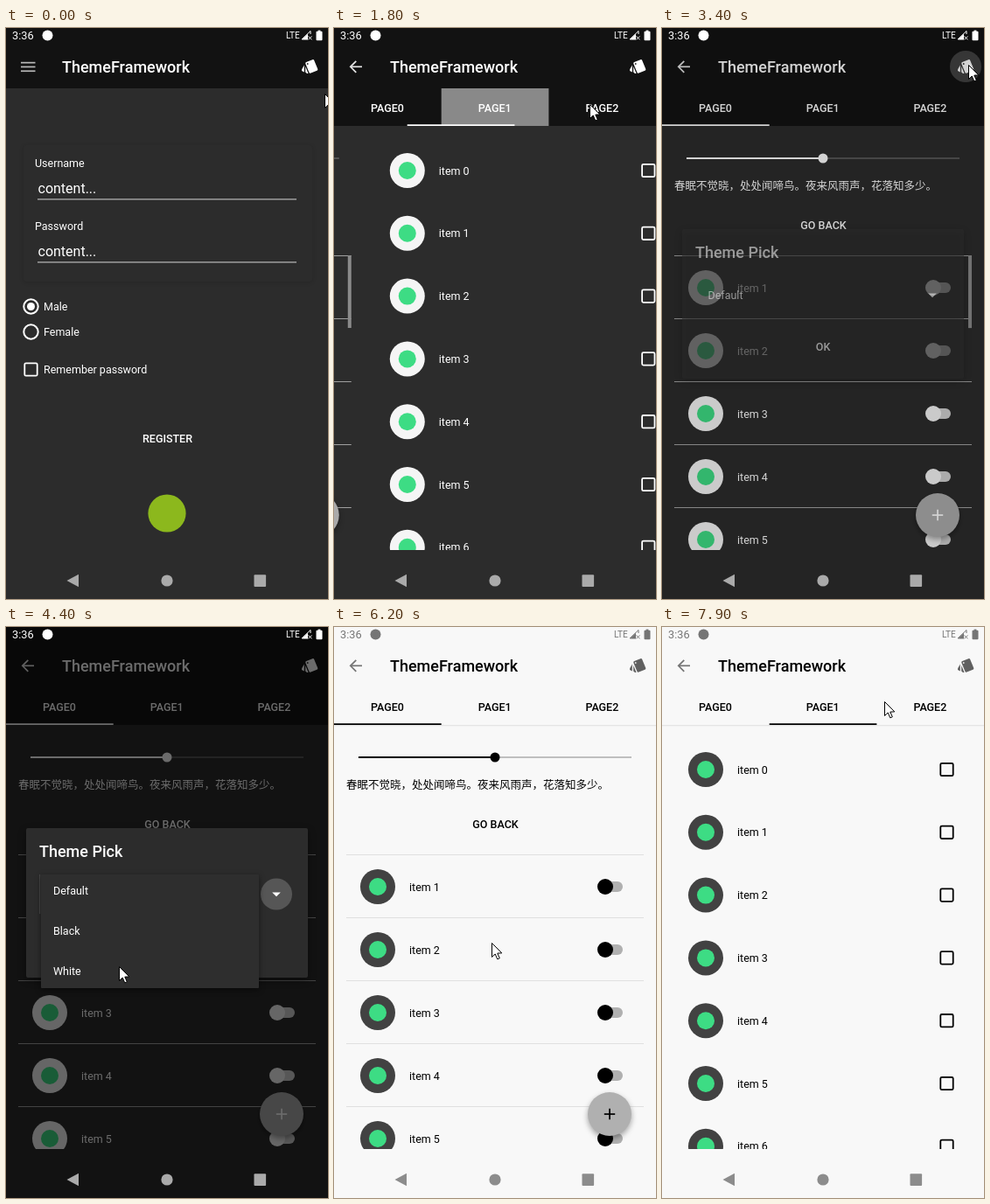
Write an HTML page with a canvas that moves like this. It is 368 px wide and 653 px high and loops after 8000 ms.

```html
<!DOCTYPE html>
<html lang="en">
<head>
<meta charset="utf-8">
<title>ThemeFramework</title>
<style>
html, body { margin: 0; width: 100%; height: 100%; overflow: hidden; background: #2c2c2c; }
canvas { display: block; width: 368px; height: 653px; }
</style>
</head>
<body>
<canvas id="stage"></canvas>
<script>
const W = 368, H = 653, LOOP = 8000, TAU = Math.PI * 2;
const canvas = document.getElementById('stage');
const g = canvas.getContext('2d');
const dpr = window.devicePixelRatio || 1;
canvas.width = W * dpr;
canvas.height = H * dpr;

const DARK = {
  bg: '#2c2c2c', bar: '#121212', fg: '#fff', icon: '#e4e4e4', status: '#fff', nav: '#aaa',
  disc: '#f5f5f5', line: '#a0a0a0', off: '#626262', thumb: '#f4f4f4', track: '#cfcfcf',
  fab: '#aaa', scroll: '#8a8a8a', ripple: .5
};
const LIGHT = {
  bg: '#f8f8f8', bar: '#f8f8f8', fg: '#000', icon: '#757575', status: '#757575', nav: '#8c8c8c',
  disc: '#424242', line: '#e0e0e0', off: '#adadad', thumb: '#000', track: '#b0b0b0',
  fab: '#b0b0b0', scroll: '#b5b5b5', ripple: .2
};
let c = DARK;

// Timing
const clamp = v => Math.min(1, Math.max(0, v));
const ramp = (t, a, b) => clamp((t - a) / (b - a));
const mix = (a, b, k) => a + (b - a) * k;
const smooth = k => k * k * (3 - 2 * k);
const quint = k => 1 - (1 - k) ** 5;
const pulse = (t, a, b, grow = 100, fall = 200) => ramp(t, a, a + grow) * (1 - ramp(t, b, b + fall));
function standard(x) { // cubic-bezier(.4, 0, .2, 1)
  let lo = 0, hi = 1, s = .5;
  for (let i = 0; i < 20; i++) {
    s = (lo + hi) / 2;
    const r = 1 - s;
    if (1.2 * r * r * s + .6 * r * s * s + s ** 3 < x) lo = s; else hi = s;
  }
  return s * s * (3 - 2 * s);
}

// Drawing
function group(fn, alpha = 1, x = 0, y = 0) {
  if (alpha <= 0) return;
  g.save();
  g.globalAlpha *= alpha;
  g.translate(x, y);
  fn();
  g.restore();
}
function clip(x, y, w, h) {
  g.beginPath();
  g.rect(x, y, w, h);
  g.clip();
}
function rect(x, y, w, h, color, r = 0) {
  g.fillStyle = color;
  g.beginPath();
  g.roundRect(x, y, w, h, r);
  g.fill();
}
function disc(x, y, r, color) {
  g.fillStyle = color;
  g.beginPath();
  g.arc(x, y, r, 0, TAU);
  g.fill();
}
function ring(x, y, r, color) {
  g.strokeStyle = color;
  g.lineWidth = 2;
  g.beginPath();
  g.arc(x, y, r, 0, TAU);
  g.stroke();
}
function box(x, y, color) {
  g.strokeStyle = color;
  g.lineWidth = 1.8;
  g.beginPath();
  g.roundRect(x - 7.2, y - 7.2, 14.4, 14.4, 1.5);
  g.stroke();
}
function poly(points, color) {
  g.fillStyle = color;
  g.beginPath();
  for (let i = 0; i < points.length; i += 2) g.lineTo(points[i], points[i + 1]);
  g.closePath();
  g.fill();
}
function stroke(points, color, width) {
  g.strokeStyle = color;
  g.lineWidth = width;
  g.beginPath();
  for (let i = 0; i < points.length; i += 2) g.lineTo(points[i], points[i + 1]);
  g.stroke();
}
function text(s, x, y, { size = 12.5, weight = 400, align = 'left', color = c.fg } = {}) {
  g.font = `${weight} ${size}px Roboto, "Noto Sans CJK SC", "Noto Sans CJK", sans-serif`;
  g.textAlign = align;
  g.fillStyle = color;
  g.fillText(s, x, y);
}
const button = (s, x, y) => text(s, x, y, { weight: 500, align: 'center' });
function shadow(blur, dy, alpha, fn) {
  g.save();
  g.shadowColor = `rgba(0,0,0,${alpha})`;
  g.shadowBlur = blur * dpr;
  g.shadowOffsetY = dy * dpr;
  fn();
  g.restore();
}

function toolbar(t, back) {
  rect(0, 0, W, 69, c.bar);
  if (back) {
    stroke([32, 44.3, 19, 44.3], c.icon, 1.7);
    stroke([25.3, 37.8, 18.8, 44.3, 25.3, 50.8], c.icon, 1.7);
  } else {
    for (const y of [38.8, 43.6, 48.4]) rect(17, y, 16.5, 1.7, '#b8b8b8');
  }
  text('ThemeFramework', 64, 51.3, { size: 18, weight: 500 });
  group(() => disc(347, 44, 18, c.fg), .2 * pulse(t, 3180, 3450));
  const color = c === DARK ? '#fff' : '#606060';
  group(() => {
    g.rotate(-.39);
    rect(-5, -6.8, 10.6, 13.6, color, 1.5);
    disc(-2.8, -4.4, .9, c.bar);
  }, 1, 349, 44);
  poly([342.2, 44, 345.5, 52, 344, 52, 342.2, 50.5], color);
  poly([340.8, 42.5, 340.8, 50.6, 338, 49, 338, 47.5], color);
}

function login(t) {
  rect(0, 0, W, H, c.bg);
  toolbar(t, false);
  shadow(5, 1, .16, () => rect(20, 134, 330, 156, c.bg, 4));
  [['Username', 155], ['Password', 227]].forEach(([label, y]) => {
    text(label, 33, y + 4.3);
    text('content...', 36.5, y + 34, { size: 16 });
    rect(36, y + 40.3, 296, 1.3, '#b4b4b4');
  });
  ring(28.5, 318.5, 8.2, '#fff');
  disc(28.5, 318.5, 4.5, '#fff');
  ring(28.5, 347.5, 8.2, '#fff');
  box(28.5, 390.5, '#fff');
  text('Male', 43, 323);
  text('Female', 43, 352);
  text('Remember password', 43, 395);
  group(() => {
    clip(143, 448, 82, 43);
    disc(170, 466, 60 * ramp(t, 780, 950), '#fff');
  }, .25 * pulse(t, 780, 1000));
  button('REGISTER', 184.5, 474);
  disc(184, 555, 21.6, '#8cb81d');
}

function row(i, y) {
  disc(50, y, 20, c.disc);
  disc(50, y, 10, '#3ddc84');
  text('item ' + i, 86, y + 4.5);
}
function switchPage(scroll, bar) {
  rect(28, 148.2, 312, 1.6, c.off);
  rect(28, 148, 156, 2, c.fg);
  disc(184, 149, 5.5, c.fg);
  text('春眠不觉晓，处处闻啼鸟。夜来风雨声，花落知多少。', 14, 185.3);
  button('GO BACK', 184.5, 229.8);
  group(() => {
    clip(0, 250, W, 347);
    for (let i = 0; i < 20; i++) {
      const y = 288 + i * 72 - scroll;
      if (y < 220 || y > 630) continue;
      row(i, y);
      rect(305, y - 6, 25, 12, c.track, 6);
      disc(310, y, 9, c.thumb);
      rect(14, y + 35, 340, 1, c.line);
    }
    group(() => rect(350, 245 + scroll * .24, 4, 83, c.scroll), bar);
  });
  shadow(6, 3, .35, () => disc(315, 557, 25, c.fab));
  rect(308.8, 556.2, 12.4, 1.7, c.fg);
  rect(314.2, 550.8, 1.7, 12.4, c.fg);
}
function listPage(mark) {
  for (let i = 0; i < 7; i++) {
    const y = 163 + i * 71.8;
    row(i, y);
    mark(325.5, y);
  }
}
const pages = [
  null,
  () => listPage((x, y) => box(x, y, c.fg)),
  () => listPage((x, y) => ring(x, y, 8.2, c.fg))
];

// Tab changes: time, from, to
const TABS = [[1670, 0, 1], [2000, 1, 2], [2810, 2, 0], [7350, 0, 1]];

function home(t) {
  let page = 0, mark = 0;
  for (const [at, from, to] of TABS) {
    if (t < at) continue;
    page = mix(from, to, quint(ramp(t, at, at + 345)));
    mark = mix(from, to, standard(ramp(t, at, at + 300)));
  }
  if (t >= 6130 && t < 7350) page = mark = 0;
  const light = c === LIGHT;
  const scroll = 63 * smooth(ramp(t, 1250, 1550)) + 153 * smooth(ramp(t, 6280, 6750));
  const bar = light ? pulse(t, 6250, 6750, 50) : pulse(t, 1250, 3700, 50);
  rect(0, 0, W, H, c.bg);
  group(() => {
    clip(0, 112, W, 485);
    for (let i = 0; i < 3; i++) {
      const x = (i - page) * W;
      if (Math.abs(x) >= W) continue;
      group(() => i ? pages[i]() : switchPage(scroll, bar), 1, x);
    }
  });
  toolbar(t, true);
  rect(0, 69, W, 43, c.bar);
  for (const [at, , to] of TABS)
    group(() => rect(to * 122.7, 69, 122.7, 43, c.fg), c.ripple * pulse(t, at - 50, at + 140, 90));
  if (light) rect(0, 112.3, W, 1, '#dedede');
  for (let i = 0; i < 3; i++) button('PAGE' + i, 61 + i * 122.7, 95.8);
  rect(mark * 122.7, 110.3, 122.7, 1.8, c.fg);
}

function dialog(t) {
  const closing = 1 - ramp(t, 6070, 6190);
  group(() => rect(0, 0, W, H, '#000'), .58 * smooth(ramp(t, 3300, 3580)) * closing);
  c = DARK;
  group(() => {
    shadow(9, 3, .4, () => rect(23, 230, 322, 171, '#2c2c2c', 2));
    text('Theme Pick', 38, 262.8, { size: 18, weight: 500 });
    text(t < 4680 ? 'Default' : 'White', 52.5, 310.3);
    group(() => disc(309, 305.5, 18, '#fff'), .2 * pulse(t, 4130, 4480));
    poly([304.2, 303.5, 313.8, 303.5, 309, 308.2], '#fff');
    group(() => {
      clip(144, 343, 76, 43);
      disc(182, 364.5, 40 * smooth(ramp(t, 5870, 5980)), '#fff');
    }, .22 * ramp(t, 5870, 5940));
    button('OK', 184, 369.3);
  }, ramp(t, 3300, 3490) * closing);

  const open = ramp(t, 4240, 4380) * (1 - ramp(t, 4700, 4860));
  group(() => {
    rect(38, 283, 1.2, 45, '#484848');
    shadow(6, 2, .5, () => rect(40, 283, 249, 130, '#2e2e2e', 1));
    group(() => rect(40, 371, 249, 42, '#fff'), .2 * pulse(t, 4590, 4720));
    ['Default', 'Black', 'White'].forEach((s, i) => text(s, 54, 306.3 + i * 46));
  }, open);
}

function systemBars() {
  const s = c.status;
  text('3:36', 7, 13, { size: 12.8, color: s });
  disc(47.5, 8.5, 6, s);
  text('LTE', 320, 12, { size: 10, color: s });
  stroke([338, 13, 348, 3.5, 348, 7], s, 1);
  poly([338, 13.5, 345, 6.7, 345, 13.5], s);
  stroke([345.6, 9.5, 349.4, 13.3], s, 1);
  stroke([349.4, 9.5, 345.6, 13.3], s, 1);
  rect(354.5, 3.8, 7, 10.4, s, 1);
  rect(356.6, 2.6, 2.8, 2, s);
  poly([69.5, 632, 83, 624.8, 83, 639.2], c.nav);
  disc(184, 632, 6.6, c.nav);
  rect(283.5, 625.3, 13.6, 13.6, c.nav, 1);
}

// Pointer stops: time, x, y
const PATH = [
  [100, 364, 75], [580, 168, 462], [950, 168, 462], [1250, 186, 370], [1400, 186, 340],
  [1600, 188, 92], [1680, 188, 90], [1800, 292, 87], [1900, 304, 89], [2580, 304, 89],
  [2770, 62, 92], [2840, 62, 92], [3130, 350, 42], [3580, 350, 42], [4050, 308, 302],
  [4200, 308, 302], [4400, 129, 388], [5380, 129, 388], [5800, 180, 361], [6780, 180, 361],
  [7000, 174, 198], [7100, 177, 160], [7270, 186, 90], [7580, 186, 90], [7880, 254, 85]
];
function pointer(t) {
  let n = PATH.findIndex(p => p[0] > t);
  if (n < 0) n = PATH.length;
  const a = PATH[Math.max(0, n - 1)], b = PATH[Math.min(n, PATH.length - 1)];
  const k = a === b ? 0 : smooth(ramp(t, a[0], b[0]));
  group(() => {
    const shape = [0, 0, 0, 16, 3.7, 12.5, 6.3, 18.4, 8.8, 17.3, 6.3, 11.6, 11.3, 11.4, 0, 0];
    poly(shape, '#fff');
    stroke(shape, '#000', 1);
  }, 1, mix(a[1], b[1], k) + .5, mix(a[2], b[2], k) + .5);
}

function draw(t) {
  const theme = t < 6130 ? DARK : LIGHT;
  c = theme;
  g.setTransform(dpr, 0, 0, dpr, 0, 0);
  if (t < 1200) login(t);
  const enter = quint(ramp(t, 930, 1200));
  group(() => home(t), enter, 0, 40 * (1 - enter));
  if (t >= 3300 && t < 6190) dialog(t);
  c = theme;
  systemBars();
  pointer(t);
}

const start = performance.now();
function frame() {
  draw((performance.now() - start) % LOOP);
  requestAnimationFrame(frame);
}
frame();
</script>
</body>
</html>
```
